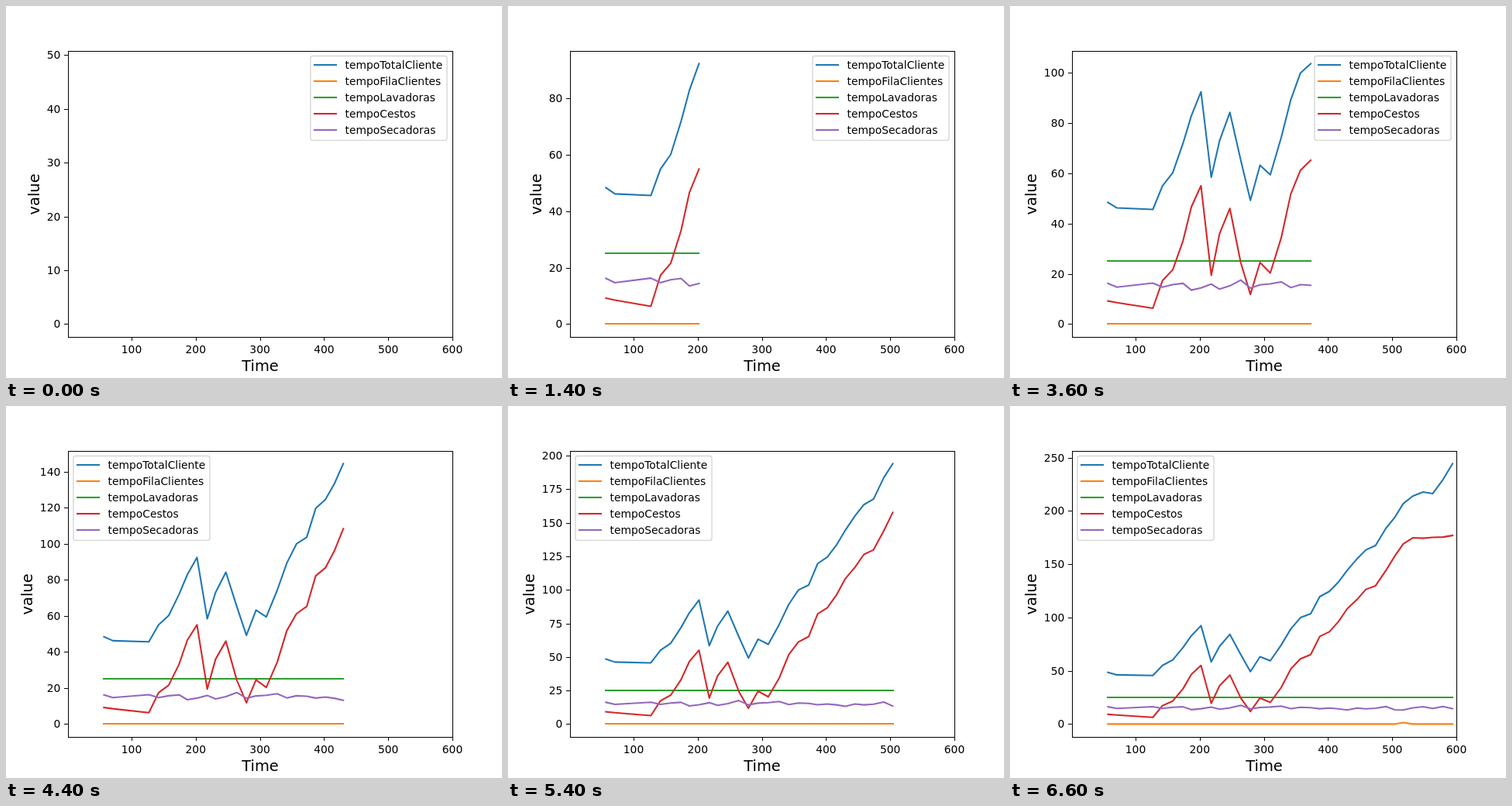
An HTML page with a canvas for the animation above (8000 ms loop, 640 by 480 pixels).

```html
<!DOCTYPE html>
<html lang="pt">
<head>
<meta charset="utf-8">
<title>Queue times</title>
<style>
html, body { margin: 0; width: 100%; height: 100%; overflow: hidden; background: #fff; }
canvas { display: block; }
</style>
</head>
<body>
<canvas id="chart" width="640" height="480"></canvas>
<script>
const ctx = document.getElementById('chart').getContext('2d');
const LOOP = 8000, STEP = 200;
const L = 80, R = 576, T = 57.6, B = 427.2;
const FONT = '"DejaVu Sans", Verdana, sans-serif';
const SMALL = `13.89px ${FONT}`, LARGE = `19.44px ${FONT}`;

const times = [57, 71, 127, 142, 158, 174, 187, 202, 218, 231, 247, 264, 279, 294, 310, 327, 342,
  357, 373, 387, 402, 416, 430, 445, 459, 474, 490, 504, 517, 532, 548, 563, 579, 594];
const total = [48.4, 46.2, 45.6, 55, 60.2, 71.9, 82.9, 92.4, 58.4, 73, 84.2, 65.2, 49.2, 63.2, 59.4, 74.2, 89.3,
  99.9, 103.6, 119.6, 124.5, 133.2, 144.4, 155, 163.5, 167.6, 183.6, 194, 206.8, 214, 217.8, 216.3, 229.4, 244.4];
const baskets = [9.2, 8.5, 6.3, 17.3, 21.6, 33.1, 46.6, 55, 19.4, 36, 46, 24.4, 11.8, 24.5, 20.3, 34.3, 51.8,
  61.2, 65.2, 82.2, 86.6, 96, 108.3, 116.8, 126.4, 129.8, 144, 157.7, 169, 174.8, 174.4, 175.2, 175.5, 177];
const dryers = [16.2, 14.7, 16.3, 14.7, 15.7, 16.2, 13.5, 14.4, 15.9, 13.9, 15.2, 17.5, 14.3, 15.6, 16, 16.8, 14.5,
  15.7, 15.4, 14.4, 15, 14.3, 13.2, 15, 14.3, 14.8, 16.4, 13.4, 13.2, 15.2, 16.3, 14.7, 16.5, 14.5];

const series = [
  { name: 'tempoTotalCliente', color: '#1f77b4', data: total },
  { name: 'tempoFilaClientes', color: '#ff7f0e', data: times.map(t => t === 517 ? 1.4 : 0) },
  { name: 'tempoLavadoras', color: '#2ca02c', data: times.map(() => 25) },
  { name: 'tempoCestos', color: '#d62728', data: baskets },
  { name: 'tempoSecadoras', color: '#9467bd', data: dryers }
];

const xPos = t => L + (t - 1) * (R - L) / 599;

function text(str, x, y, align, font = SMALL) {
  ctx.font = font;
  ctx.textAlign = align;
  ctx.fillStyle = '#000';
  ctx.fillText(str, x, y);
}

function line(points, color, width, cap = 'butt') {
  ctx.strokeStyle = color;
  ctx.lineWidth = width;
  ctx.lineCap = cap;
  ctx.lineJoin = 'round';
  ctx.beginPath();
  points.forEach(([x, y]) => ctx.lineTo(x, y));
  ctx.stroke();
}

function tickStep(range) {
  const raw = range / 9;
  const mag = 10 ** Math.floor(Math.log10(raw));
  return mag * [1, 2, 2.5, 5, 10].find(s => s * mag >= raw);
}

function drawLines(count, yPos) {
  if (count < 2) return;
  ctx.save();
  ctx.beginPath();
  ctx.rect(L, T, R - L, B - T);
  ctx.clip();
  for (const { data, color } of series) {
    const vals = data.slice(0, count);
    const flat = vals.every(v => v === vals[0]);
    const snap = v => flat ? Math.round(v) : v;
    line(vals.map((v, i) => [snap(xPos(times[i])), snap(yPos(v))]), color, 2.08, 'square');
  }
  ctx.restore();
}

function drawAxes(max, yPos) {
  for (let t = 100; t <= 600; t += 100) {
    const x = Math.round(xPos(t));
    line([[x + 0.5, 428], [x + 0.5, 432]], '#000', 1);
    text(t, xPos(t), 448, 'center');
  }
  const step = tickStep(max * 1.1);
  let last = 0;
  for (let v = 0; v <= max * 1.05; v += step) {
    const y = Math.round(yPos(v));
    line([[75, y + 0.5], [80, y + 0.5]], '#000', 1);
    text(v, 70.3, y + 5, 'right');
    last = v;
  }
  ctx.strokeStyle = '#000';
  ctx.lineWidth = 1;
  ctx.lineJoin = 'miter';
  ctx.strokeRect(80.5, 58.5, 496, 369);

  text('Time', 328, 471, 'center', LARGE);
  ctx.save();
  ctx.translate(last >= 100 ? 34.4 : 43.2, 242.9);
  ctx.rotate(-Math.PI / 2);
  text('value', 0, 0, 'center', LARGE);
  ctx.restore();
}

// The legend moves out of the way of the growing curves.
function drawLegend(count) {
  const x = count > 20 ? 86.94 : 392.94;
  const y = count === 20 ? 188 : 64.5;
  ctx.beginPath();
  ctx.roundRect(x, y, 176.1, 108.9, 2.8);
  ctx.fillStyle = 'rgba(255,255,255,0.8)';
  ctx.fill();
  ctx.strokeStyle = 'rgba(204,204,204,0.8)';
  ctx.lineWidth = 1.39;
  ctx.stroke();
  series.forEach(({ name, color }, i) => {
    const row = Math.round(y + 11.4 + i * 21);
    const x0 = Math.round(x + 5.3);
    line([[x0, row], [x0 + 28, row]], color, 2.08, 'square');
    text(name, x + 44.5, row + 5, 'left');
  });
}

function draw(now) {
  const count = Math.min(times.length, Math.floor((now % LOOP) / STEP) + 1);
  const max = Math.max(...total.slice(0, count));
  const base = B - (B - T) / 22;
  const yPos = v => base - v * (B - T) / (1.1 * max);
  ctx.fillStyle = '#fff';
  ctx.fillRect(0, 0, 640, 480);
  drawLines(count, yPos);
  drawAxes(max, yPos);
  drawLegend(count);
}

function loop() {
  draw(performance.now());
  requestAnimationFrame(loop);
}
loop();
</script>
</body>
</html>
```
